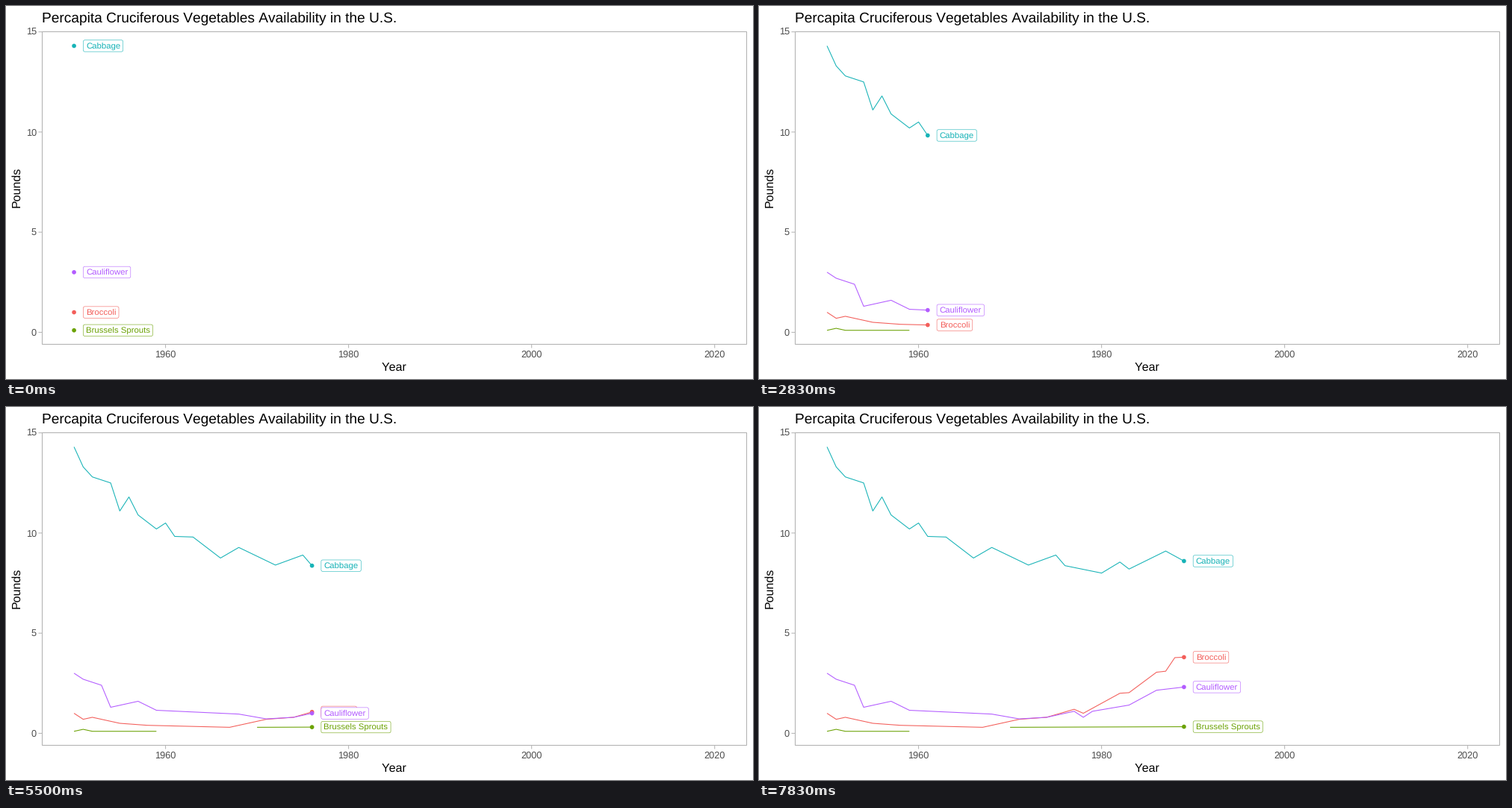
These frames come from a looping animation (1000 px wide and 500 px high, 8000 ms). A matplotlib script:

```python
import numpy as np
import matplotlib.pyplot as plt
from matplotlib.animation import FuncAnimation
from matplotlib.patches import Circle, FancyBboxPatch, Rectangle

plt.rcParams["font.family"] = "Liberation Sans"
plt.rcParams["text.hinting"] = "none"
plt.rcParams["text.kerning_factor"] = 6     # plain advances, no pair kerning
plt.rcParams["path.snap"] = False

W, H, DPI = 1000, 500, 100
PX = 72 / DPI                               # points per pixel
LEFT, RIGHT, TOP, BOTTOM = 48.2, 991.6, 34.4, 453.8
X_RANGE, Y_RANGE = (1946.5, 2023.5), (-0.61, 15.01)

LOOP, TICK = 8000, 40                       # ms
STEPS_PER_SECOND, HOLD = 6, 5
FIRST_YEAR, YEARS, REVEAL_STEPS = 1950, 70, 75

# Turning points of each curve: years since the first, pounds.
CROPS = [
    ("Broccoli", "#F35E5A",
     [(0, 1), (1, .7), (2, .8), (5, .5), (8, .4), (17, .3), (21, .7),
      (24, .8), (27, 1.2), (28, 1), (32, 2), (33, 2.03), (36, 3.05),
      (37, 3.1), (38, 3.78), (39, 3.8)]),
    ("Brussels Sprouts", "#6BA204",
     [(0, .1), (1, .2), (2, .1), (9, .1), (20, .3), (39, .33)]),
    ("Cabbage", "#17B3B7",
     [(0, 14.3), (1, 13.3), (2, 12.8), (4, 12.5), (5, 11.1), (6, 11.8),
      (7, 10.9), (9, 10.2), (10, 10.5), (11, 9.83), (13, 9.8), (16, 8.75),
      (18, 9.28), (22, 8.4), (25, 8.9), (26, 8.37), (30, 8), (32, 8.55),
      (33, 8.2), (37, 9.1), (39, 8.6)]),
    ("Cauliflower", "#B35CFF",
     [(0, 3), (1, 2.7), (3, 2.4), (4, 1.3), (7, 1.6), (9, 1.15), (18, .96),
      (21, .72), (24, .8), (27, 1.1), (28, .8), (29, 1.1), (33, 1.41),
      (36, 2.15), (39, 2.31)]),
]
NO_DATA = {"Brussels Sprouts": slice(10, 20)}
OFFSETS = np.arange(40)
# Each year is reached on a whole step of the reveal.
KEYS = np.round(OFFSETS * REVEAL_STEPS / YEARS)


def to_x(year):
    return LEFT + (year - X_RANGE[0]) / (X_RANGE[1] - X_RANGE[0]) * (RIGHT - LEFT)


def to_y(pounds):
    return BOTTOM - (pounds - Y_RANGE[0]) / (Y_RANGE[1] - Y_RANGE[0]) * (BOTTOM - TOP)


def yearly(name, points):
    values = np.interp(OFFSETS, *zip(*points))
    if name in NO_DATA:
        values[NO_DATA[name]] = np.nan
    return values


fig = plt.figure(figsize=(W / DPI, H / DPI), dpi=DPI, facecolor="white")
ax = fig.add_axes([0, 0, 1, 1])
ax.set(xlim=(0, W), ylim=(H, 0))
ax.axis("off")


def write(x, y, text, size, color="black", **kw):
    return ax.text(x, y, text, fontsize=size * PX, color=color,
                   va="baseline", **kw)


def draw_frame():
    grey, dark = "#B3B3B3", "#4D4D4D"
    ax.add_patch(Rectangle((48.5, 34.5), 943, 419, fill=False,
                           ec=grey, lw=1.07 * PX))
    for year in range(1960, 2021, 20):
        x = to_x(year)
        ax.plot([x, x], [454, 458], color=grey, lw=PX)
        write(x, 471, str(year), 12.8, dark, ha="center")
    for pounds in range(0, 16, 5):
        y = to_y(pounds)
        ax.plot([44, 48], [y, y], color=grey, lw=PX)
        write(40.8, y + 4.6, str(pounds), 12.8, dark, ha="right")
    write(48, 22, "Percapita Cruciferous Vegetables Availability in the U.S.", 19.2)
    write(520, 489, "Year", 16, ha="center")
    write(18.8, 242.5, "Pounds", 16, ha="center", rotation=90,
          rotation_mode="anchor")


class Series:
    PAD, BOX_H = 3.6, 15.4

    def __init__(self, order, name, color, points):
        self.x = to_x(FIRST_YEAR + OFFSETS)
        self.y = to_y(yearly(name, points))
        self.line, = ax.plot([], [], color=color, lw=1.07 * PX, zorder=4,
                             solid_joinstyle="round", solid_capstyle="butt")
        self.dot = ax.add_patch(Circle((0, 0), 2.84, fc=color, lw=0, zorder=5))
        top = 6 + order / 10
        self.text = write(0, 0, name, 11.38, color, zorder=top + 0.05)
        width = self.text.get_window_extent().width + 2 * self.PAD
        self.box = ax.add_patch(FancyBboxPatch(
            (0, 0), width, self.BOX_H, boxstyle="round,pad=0,rounding_size=2.16",
            fc="white", ec=color, lw=0.55 * PX, zorder=top))

    def show(self, step):
        x = np.interp(step, KEYS, self.x)
        y = np.interp(step, KEYS, self.y)
        past = KEYS <= step
        self.line.set_data(np.append(self.x[past], x), np.append(self.y[past], y))
        present = bool(np.isfinite(y))
        for part in (self.dot, self.box, self.text):
            part.set_visible(present)
        if present:
            label_x = x + to_x(1) - to_x(0)
            self.dot.center = (x, y)
            self.box.set_x(label_x)
            self.box.set_y(y - self.BOX_H / 2)
            self.text.set_position((label_x + self.PAD, y + 4.07))


draw_frame()
series = [Series(i, *crop) for i, crop in enumerate(CROPS)]


def update(i):
    ms = (i + 1) * TICK - 1
    step = max(0, ms * STEPS_PER_SECOND // 1000 - HOLD)
    for s in series:
        s.show(step)
    return []


anim = FuncAnimation(fig, update, frames=LOOP // TICK, interval=TICK,
                     init_func=lambda: update(0), repeat=True, repeat_delay=0)
plt.show()
```
